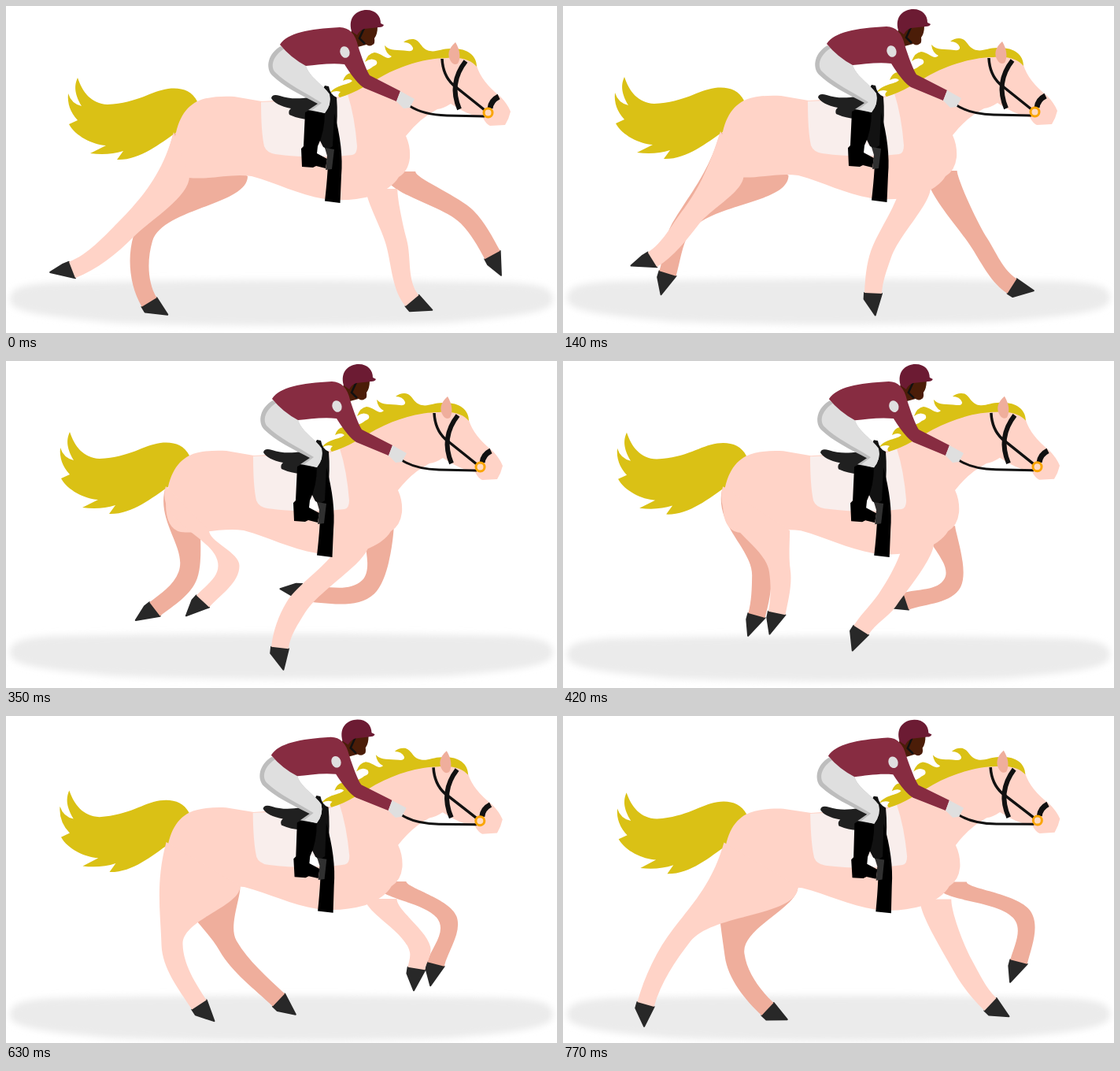
These frames come from a looping animation (700 px wide and 415 px high, 0.84 s). An HTML page:

```html
<!DOCTYPE html>
<html lang="en">
<head>
<meta charset="utf-8">
<title>Galloping horse</title>
<style>
html, body { margin: 0; width: 100%; height: 100%; overflow: hidden; background: #fff; }
svg { display: block; width: 100vw; height: 100vh; }
.coat { fill: #ffd3c7; }
.far { fill: #efae9c; }
.hair { fill: #dac115; }
.hoof { fill: #282828; stroke: #282828; stroke-width: 2; stroke-linejoin: round; }
.strap { fill: none; stroke: #111; stroke-linecap: butt; }
</style>
</head>
<body>
<svg viewBox="0 0 700 415" xmlns="http://www.w3.org/2000/svg">
  <defs>
    <filter id="soft" x="-5%" y="-30%" width="110%" height="160%"><feGaussianBlur stdDeviation="4.5"/></filter>
  </defs>
  <path id="shadow" fill="#ebebeb" filter="url(#soft)" d="M5,373C5,358 18,354 60,351Q350,345 640,351C682,354 695,358 695,373C695,389 650,394 560,402Q350,409 140,402C50,394 5,389 5,373Z"/>
  <g id="farLegs"></g>
  <g class="torso">
    <path class="hair" d="M243,121C236,107 222,103 206,105C184,108 168,123 129,125C108,124 97,109 91,91C87,100 86,110 96,127Q83,124 79,111Q77,130 91,145L80,150C88,165 110,176 127,177L107,187Q130,190 149,184L141,195C170,196 195,175 217,160L235,130Z"/>
    <path class="coat" d="M243,121C255,115 275,114 290,115L325,121L425,115C445,107 462,96 480,87C510,71 540,64 575,64Q592,66 598,76Q604,96 628,115Q637,124 641,134Q639,143 634,151L615,152Q610,150 606,142Q585,138 565,124Q556,130 548,131Q526,142 508,165Q514,178 513,193Q511,210 499,217Q490,232 465,241Q435,249 405,245C370,239 345,225 312,216C285,212 260,221 232,218Q213,214 213,182C215,150 225,130 243,121Z"/>
  </g>
  <g id="nearLegs"></g>
  <g class="torso">
    <path fill="#f9eeec" d="M324,122Q324,160 328,178Q331,186 342,188Q395,195 440,189Q446,188 446,178Q443,140 434,112L420,118Z"/>
    <path class="hair" d="M598,77C598,62 585,53 565,54C552,54 545,60 535,56C526,52 526,42 516,42Q510,42 505,46Q514,46 517,53Q518,58 510,57C498,55 488,58 481,50Q482,60 490,64C484,70 478,60 468,59Q460,60 456,71Q463,65 470,69Q474,74 466,77C460,82 448,86 438,85Q431,86 428,95Q436,91 440,95C434,101 420,99 411,111Q418,106 425,109Q420,113 424,116C445,110 462,98 480,88C510,72 540,66 560,66C580,64 592,70 598,77Z"/>
    <path class="far" d="M571,46C562,54 560,62 565,70Q569,76 574,73C578,66 577,56 571,46Z"/>
    <g class="strap">
      <path stroke-width="3.5" d="M554,67Q555,88 568,100L608,132"/>
      <path stroke-width="6" d="M584,70Q562,98 576,131"/>
      <path stroke-width="7" d="M626,115Q616,120 615,130"/>
      <path stroke-width="3" d="M513,127Q530,138 560,139L608,140"/>
    </g>
    <circle cx="612.5" cy="135.5" r="5.5" fill="#ffd9c0" stroke="#faa500" stroke-width="3"/>

    <path fill="#202020" d="M337,117Q338,111 348,114C365,120 385,117 400,112L398,142Q380,147 360,138Q358,133 362,130Q342,126 337,117Z"/>
    <path fill="#121212" d="M396,118L405,101L410,102Q412,113 420,116Q422,140 419,165L417,182L404,181L396,165Z"/>
    <path d="M417,136Q429,180 426,215L424.5,250L405,247.5Q410,205 409,182L415,178Z"/>
    <path fill="#fff" d="M395,175L405,180L407,190L395,189Z"/>
    <path d="M380,135Q392,127 405,134Q405,160 396,178L395,187L408,194L406,206L394,203L390,205L376,204L375,181L378,178Z"/>
    <path fill="#303030" d="M405,180L417,182L414,207L406,208L408,190Z"/>

    <path fill="#bdbdbd" d="M349,51C333,60 329,78 338,88C352,102 375,113 396,124L384,132L405,136Q414,125 411,112C403,100 385,90 381,76Z"/>
    <path fill="#dfdfdf" d="M354,54C340,62 335,76 342,84C357,99 379,109 401,123L389,132L405,136Q414,125 411,112C403,100 385,90 381,76Z"/>
    <path fill="#4b1d08" d="M440,28L472,26Q472,36 468,41Q469,48 466,49Q462,52 458,49L447,52L436,40Z"/>
    <path class="strap" stroke="#222" stroke-width="2.5" d="M455,28L449,41L456,48"/>
    <path fill="#872c41" d="M348,49C358,34 384,29 424,27C436,27 444,36 447,50C452,66 458,82 462,88L501,108L496,121L455,104Q445,98 430,74C412,72 395,75 381,76Q362,66 348,49Z"/>
    <ellipse cx="430.5" cy="58.5" rx="6" ry="7.5" fill="#dfdfdf" transform="rotate(-20 430.5 58.5)"/>
    <path fill="#dfdfdf" d="M501,108L519,118L513,129L505,130L496,121Z"/>
    <path fill="#6c1b33" d="M439,32C434,14 446,5 458,5C470,5 476,13 476,22L480,24Q479,27 474,27L455,29Q449,31 446,37Z"/>
  </g>
</svg>
<script>
const STEP = 70, CYCLE = 12;
const NS = 'http://www.w3.org/2000/svg';

// Keys: step, then dx, dy, tilt, shadow drop.
const bodyKeys = [
  [0, 0, 0, 0, 0], [1, -17, -1, 0, -1], [3, -9, -1, 0, -2], [5, -10, -1, 0, -2],
  [8, -9.6, -0.6, -0.3, 7], [10, -9.3, 0.5, -1, 7], [11, -8.5, 0.6, -1, 7]
];

// Keys: step, then knee x y, ankle x y, direction of the toe in degrees.
const nearHind = [
  [0, 152, 284, 84, 335, 174], [1, 131, 287, 67, 335, 176], [3, 193, 250, 160, 309, 153],
  [5, 283, 260, 250, 305, 139], [8, 260, 277, 315, 350, 49], [10, 162, 303, 176, 383, 46],
  [11, 151, 278, 105, 366, 94]
];
const farHind = [
  [0, 174, 295, 182, 376, 34], [1, 131, 306, 131, 375, 37], [3, 168, 258, 135, 304, 178],
  [5, 231, 272, 189, 315, 150], [8, 296, 274, 360, 339, 39], [10, 268, 309, 333, 382, 42],
  [11, 218, 303, 260, 372, 28]
];
// The forelegs trade sides after each stride, so one track of two cycles serves both.
const fore = [
  [3, 377, 320, 335, 356, 132], [5, 460, 287, 376, 294, 190], [8, 565, 270, 555, 327, 113],
  [10, 558, 246, 537, 303, 95], [11, 585, 255, 579, 312, 113], [12, 586, 268, 618, 316, 67],
  [13, 585, 300, 633, 330, 11],
  [15, 474, 303, 508, 381, 13], [17, 368, 313, 348, 364, 81], [20, 500, 284, 440, 297, 177],
  [22, 552, 308, 603, 344, 17], [23, 508, 317, 543, 366, 33], [24, 496, 300, 516, 374, 25],
  [25, 431, 310, 453, 373, 37]
];

function sample(keys, at, period) {
  const i = keys.filter(k => k[0] <= at).length - 1;
  const a = keys[i], b = keys[(i + 1) % keys.length];
  const k = (at - a[0]) / ((b[0] - a[0] + period) % period);
  return a.slice(1).map((v, j) => v + (b[j + 1] - v) * k);
}

const rad = deg => deg * Math.PI / 180;
const angle = (a, b) => Math.atan2(b[1] - a[1], b[0] - a[0]);
const dist = (a, b) => Math.hypot(b[0] - a[0], b[1] - a[1]);
const move = (p, dir, r) => [p[0] + r * Math.cos(dir), p[1] + r * Math.sin(dir)];
const halfway = (a, b) => a + Math.atan2(Math.sin(b - a), Math.cos(b - a)) / 2;

// Where a leg leaves the body: rear and front point, in body coordinates.
// A lifted hind hoof draws the groin back; a foreleg's shoulder follows its knee.
const hip = (knee, toe) => [[213, 160], [307 - Math.max(0, toe - 100), 216]];
const shoulder = (x, follow, y) => knee => {
  const mid = x + follow * (knee - x);
  return [[mid - 20, y], [mid + 20, y]];
};

const limbs = [
  { group: 'farLegs', skin: 'far', pose: s => sample(farHind, s, CYCLE),
    roots: hip, knee: 12.5, lean: -14, hang: [0.4, 0.25] },
  { group: 'farLegs', skin: 'far', pose: s => sample(fore, s < 3 ? s + CYCLE : s, 2 * CYCLE),
    roots: shoulder(485, 0.15, 210), knee: 11.5, lean: 0, hang: [0.25, 0.1] },
  { group: 'nearLegs', skin: 'coat', pose: s => sample(nearHind, s, CYCLE),
    roots: hip, knee: 13.5, lean: -14, hang: [0.4, 0.25] },
  { group: 'nearLegs', skin: 'coat', pose: s => sample(fore, (s < 3 ? s + CYCLE : s) + CYCLE, 2 * CYCLE),
    roots: shoulder(472, 0.22, 232), knee: 13.5, lean: 0, hang: [0.2, 0.2] }
];

function addPath(id, cls) {
  const el = document.createElementNS(NS, 'path');
  el.setAttribute('class', cls);
  return document.getElementById(id).appendChild(el);
}
for (const limb of limbs) {
  limb.hoofEl = addPath(limb.group, 'hoof');
  limb.skinEl = addPath(limb.group, limb.skin);
}
const torsos = document.querySelectorAll('.torso');
const shadow = document.getElementById('shadow');

function drawLimb(limb, step, dx, dy) {
  const [kx, ky, ax, ay, toeDeg] = limb.pose(step);
  const knee = [kx, ky], ankle = [ax, ay], toe = rad(toeDeg);
  const [rear, front] = limb.roots(kx - dx, toeDeg).map(p => [p[0] + dx, p[1] + dy]);
  const top = [(rear[0] + front[0]) / 2, (rear[1] + front[1]) / 2];
  const shin = angle(knee, ankle);
  const bend = halfway(angle(top, knee), shin), cuff = halfway(shin, toe);

  // One edge of the leg as two cubic curves, from body to hoof.
  const edge = (root, side, lean, hang) => {
    const k = move(knee, bend + side * Math.PI / 2, limb.knee);
    const c = move(ankle, cuff + side * Math.PI / 2, 11);
    const upper = dist(root, k), lower = dist(k, c);
    return [root, [root[0] + lean, root[1] + hang * upper], move(k, bend, -0.3 * upper), k,
      move(k, bend, 0.33 * lower), move(c, cuff, -0.33 * lower), c];
  };
  const a = edge(rear, 1, limb.lean, limb.hang[0]);
  const b = edge(front, -1, 0, limb.hang[1]).reverse();
  limb.skinEl.setAttribute('d', `M${a[0]}C${a.slice(1).join(' ')}L${b[0]}C${b.slice(1).join(' ')}Z`);
  limb.hoofEl.setAttribute('d', `M${a[6]}L${move(a[6], cuff, 8)}L${move(ankle, toe, 28)}L${b[0]}Z`);
}

function draw(step) {
  const [dx, dy, tilt, drop] = sample(bodyKeys, step, CYCLE);
  torsos.forEach(g => g.setAttribute('transform', `translate(${dx} ${dy}) rotate(${tilt} 410 200)`));
  shadow.setAttribute('transform', `translate(0 ${drop})`);
  limbs.forEach(limb => drawLimb(limb, step, dx, dy));
}

let shown = -1;
function tick() {
  const step = Math.floor(performance.now() / STEP) % CYCLE;
  if (step !== shown) draw(shown = step);
  requestAnimationFrame(tick);
}
tick();
</script>
</body>
</html>
```
